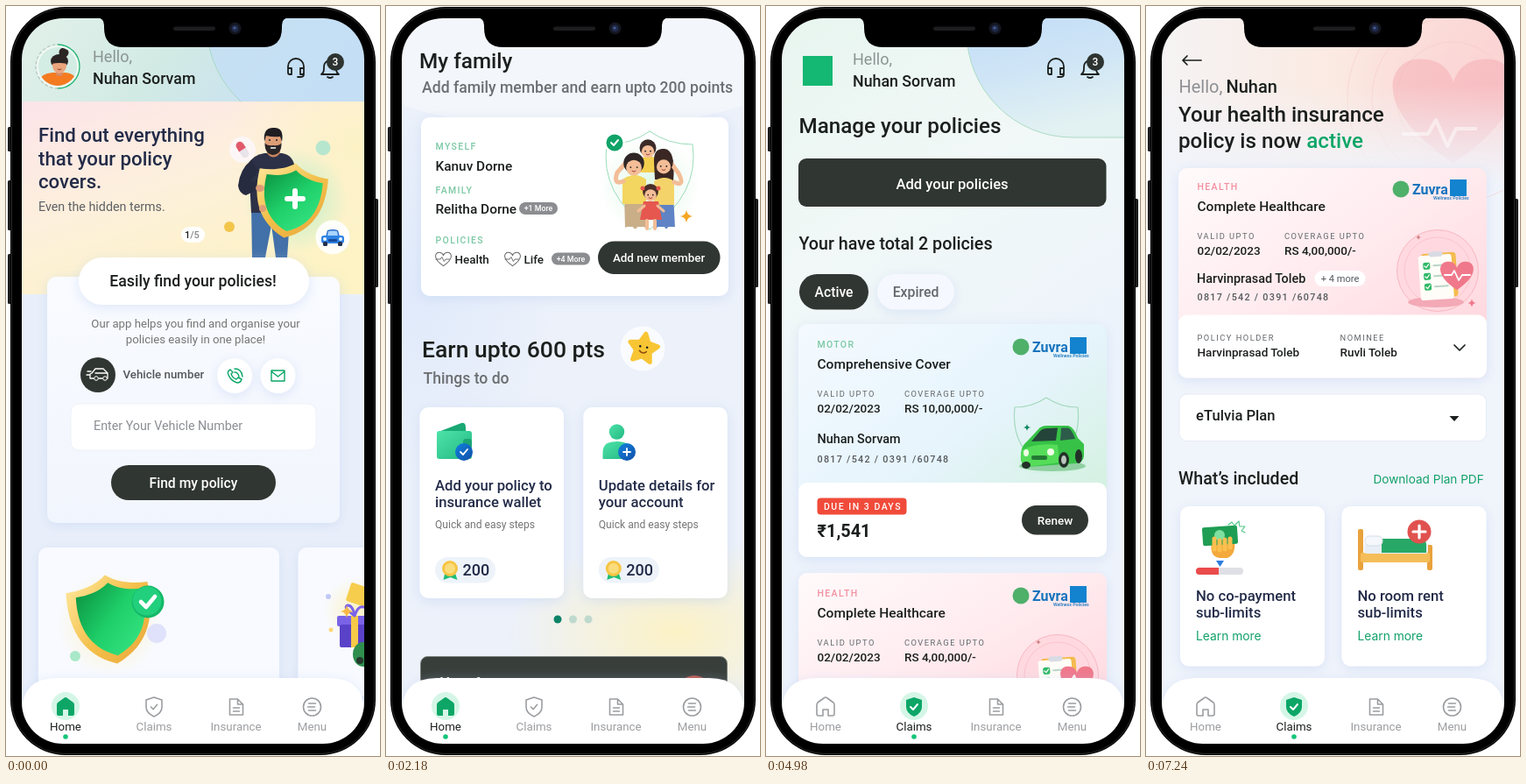
Animation, 427 px wide and 856 px high, one loop 8000 ms. Source, as an HTML page:

```html
<!DOCTYPE html>
<html lang="en">
<head>
<meta charset="utf-8">
<style>
  html, body { margin: 0; width: 100%; height: 100%; overflow: hidden; background: #fff; }
  svg { display: block; font-family: Roboto, sans-serif; }
</style>
</head>
<body>
<script>
const INK = '#1b1f1d', NAVY = '#232b48', GREY = '#757575', DARK = '#303632', GREEN = '#0da667';

// Drawing helpers: each returns SVG markup.
const text = (x, y, size, str, { fill = INK, w = 500, gap = 0, mid = false, font = '' } = {}) =>
  `<text x="${x}" y="${y}" font-size="${size}" font-weight="${w}" fill="${fill}" xml:space="preserve"` +
  (gap ? ` letter-spacing="${gap}"` : '') + (mid ? ' text-anchor="middle"' : '') +
  (font ? ` font-family="${font}"` : '') + `>${str}</text>`;
const box = (x, y, w, h, r, fill, extra = '') =>
  `<rect x="${x}" y="${y}" width="${w}" height="${h}" rx="${r}" fill="${fill}" ${extra}/>`;
const dot = (x, y, r, fill, extra = '') => `<circle cx="${x}" cy="${y}" r="${r}" fill="${fill}" ${extra}/>`;
const oval = (x, y, rx, ry, fill, extra = '') => `<ellipse cx="${x}" cy="${y}" rx="${rx}" ry="${ry}" fill="${fill}" ${extra}/>`;
const path = (d, fill, extra = '') => `<path d="${d}" fill="${fill}" ${extra}/>`;
const line = (d, stroke, w = 1.5, extra = '') =>
  path(d, 'none', `stroke="${stroke}" stroke-width="${w}" stroke-linecap="round" stroke-linejoin="round" ${extra}`);
const at = (x, y, s, inner, rot = 0) => `<g transform="translate(${x} ${y}) rotate(${rot}) scale(${s})">${inner}</g>`;
const grad = (id, x2, y2, ...stops) =>
  `<linearGradient id="${id}" x2="${x2}" y2="${y2}">${stops.map((c, i) =>
    `<stop offset="${i / (stops.length - 1)}" stop-color="${c}"/>`).join('')}</linearGradient>`;
const glow = (id, color) => `<radialGradient id="${id}"><stop stop-color="${color}"/>` +
  `<stop offset="1" stop-color="${color}" stop-opacity="0"/></radialGradient>`;

const SHADOW = 'filter="url(#shadow)"';
const SHIELD = 'M0-50C12-40 30-36 46-36C49 0 40 34 0 50C-40 34-49 0-46-36C-30-36-12-40 0-50Z';
const HEART = 'M0 9C-15-1-11-9-6-9C-3-9-1-8 0-5C1-8 3-9 6-9C11-9 15-1 0 9Z';
const SPARK = 'M0-8Q1-1 8 0Q1 1 0 8Q-1 1-8 0Q-1-1 0-8Z';
const tick = (x, y, s, color = '#fff', w = 2) => at(x, y, s, line('M-4 0L-1 3L4-3', color, w));
const plus = (x, y, r, color, w) => line(`M${x - r} ${y}h${2 * r}M${x} ${y - r}v${2 * r}`, color, w);
const page = fill => box(18, 14, 391, 828, 0, fill);

const defs = `<defs>
  ${grad('header', 1, 0.2, '#e2f1ea', '#d2eae4', '#c6dff6')}
  ${grad('banner', 0.6, 1, '#fce4ea', '#fdf0dc', '#fdf3c4')}
  ${grad('panel', 0, 1, '#f9fbff', '#f1f5fd')}
  ${grad('green', 1, 1, '#0a8f3e', '#1fd06a', '#3be887')}
  ${grad('gold', 1, 1, '#ffe9a0', '#f3c04b', '#e9a63a')}
  ${grad('teal', 1, 1, '#4de3a8', '#22b883')}
  ${grad('blue', 1, 1, '#0f82dd', '#134fa8')}
  ${grad('claims', 0.3, 1, '#e8f5ef', '#f1f8f7', '#edf3fb', '#eef3fb')}
  ${grad('sky', 0.3, 1, '#c3ddf7', '#cfe5f6', '#e2f1f2')}
  ${grad('motor', 1, 1, '#f4faff', '#e6f4fc', '#cdf0d6')}
  ${grad('health', 1, 1, '#fffafb', '#ffeaee', '#ffd2da')}
  ${grad('active', 1, 0, '#f5f3f4', '#fbeae2', '#fbd8d5')}
  <linearGradient id="fade" x2="0" y2="1"><stop stop-color="#f0f4fb" stop-opacity="0"/>
    <stop offset="1" stop-color="#f0f4fb"/></linearGradient>
  ${glow('yellowGlow', '#fcf2c6')}${glow('pinkGlow', '#fbcfd3')}${glow('greenGlow', '#b9f0c8')}${glow('blueGlow', '#e0eafb')}
  <clipPath id="screen"><rect x="18" y="14" width="391" height="828" rx="47"/></clipPath>
  <clipPath id="face"><circle r="22"/></clipPath>
  <filter id="shadow" x="-20%" y="-30%" width="140%" height="160%">
    <feDropShadow dx="0" dy="3" stdDeviation="7" flood-color="#b4c8ee" flood-opacity=".4"/></filter>
</defs>`;

const shield = (x, y, s, rot) => at(x, y, s,
  path(SHIELD, 'url(#gold)') + at(2, 0, 0.82, path(SHIELD, 'url(#green)')), rot);

// Greeting row with headset and bell.
const greeting = y =>
  text(99, y, 18, 'Hello,', { fill: '#8b9492', w: 400 }) + text(99, y + 25.3, 17.8, 'Nuhan Sorvam') +
  at(331, 71, 1, line('M-9 2V-2A9 9 0 0 1 9-2V2M-9 0h4v7h-2q-2 0-2-2ZM9 0h-4v7h2q2 0 2-2ZM9 5v2q0 3-4 3h-3', INK, 1.8)) +
  at(370, 73, 1, line('M-10 5q3-2 3-6v-3a7 7 0 0 1 14 0v3q0 4 3 6ZM-3 8q3 2 6 0', INK, 1.8)) +
  dot(376, 64, 10, '#2d3330') + text(376, 68.3, 12, '3', { fill: '#fff', mid: true });

const ARC = 'M229 14V29A121 121 0 0 0 350 150H409';

const tabIcons = [
  ['Home', 68, 'M-10-2Q-10-4-9-5L-2-10Q0-12 2-10L9-5Q10-4 10-2V8q0 2-2 2H3V3H-3V10H-8q-2 0-2-2Z'],
  ['Claims', 169, 'M0-11L9-8V0Q9 7 0 11Q-9 7-9 0V-8Z'],
  ['Insurance', 262.5, 'M-7-9H2L8-3V9H-7ZM2-9V-3H8M-3 1H4M-3 5H4'],
  ['Menu', 349.5, 'M-10 0a10 10 0 1 0 20 0a10 10 0 1 0-20 0M-4-4H4M-5 0H3M-4 4H4'],
];
const tabs = active => path('M18 842V807Q18 767 58 767H369Q409 767 409 807V842Z', '#fff', SHADOW) +
  tabIcons.map(([name, x, d], i) => {
    const on = i === active;
    const icon = on ? path(d, GREEN) + (i ? tick(0, 0, 1) : '') : line(d, '#9b9da0', 1.6) + (i === 1 ? tick(0, 0, 0.9, '#9b9da0', 1.7) : '');
    return (on ? dot(x, 799, 16, '#d5f6e7') + dot(x, 834, 2.8, '#16c47a') : '') + at(x, 800, 1, icon) +
      text(x, 827, 13.3, name, { fill: on ? INK : '#9b9da0', w: 400, mid: true });
  }).join('');

const avatar = at(59, 69, 1,
  dot(0, 0, 25, '#eef7f3') + dot(0, 0, 22, '#d3ece4') +
  `<g clip-path="url(#face)">` + dot(7, -16, 5.5, '#2b2524') + oval(2, -6, 10, 8, '#2b2524') +
  path('M-23 22Q-22 8-6 7H9Q22 8 24 22Z', '#f47b20') + box(-2, 2, 8, 9, 3, '#d98a62') + oval(2, -1, 8, 9, '#eaa57d') +
  path('M-7-3Q-4-13 5-10Q11-9 11-3Q2-5-7-3Z', '#2b2524') + line('M0 3q2 2 4 0', '#8d3b2a', 1) + '</g>' +
  line('M0-25A25 25 0 0 1 0 25', '#22b573', 1.3) + line('M0 25A25 25 0 0 1 0-25', '#b5c9c0', 1.3, 'stroke-dasharray="3 3"'));

const man =
  path('M280 228H325L321 287H308L303 250L296 287H281Z', '#4270a8') +
  path('M277 180Q282 170 295 168H315Q328 170 330 185V236H280Z', '#2d3147') +
  path('M280 176Q267 186 265 205Q266 214 274 216L294 206L290 198L279 201L288 188Z', '#272b40') +
  path('M298 158h15v10q-8 9-15 0Z', '#c98460') + oval(305, 154, 9.5, 12.500, '#dd9d76') +
  path('M295 155Q293 139 305 139Q318 138 315 155L313 149Q305 150 297 148Z', '#1f1d22') +
  path('M295.500 156Q298 160 305 159Q312 160 314.500 156Q315 169 305 170Q295 169 295.500 156Z', '#2a2526') +
  line('M302.500 162h5', '#fff', 1.5) + dot(301, 153, 1, INK) + dot(309, 153, 1, INK) +
  shield(324, 222, 0.86, 9) + plus(330, 220, 9, '#fff', 6) + oval(290, 208, 5, 4, '#dd9d76') + oval(293, 231, 4, 4, '#dd9d76');

const blueCar = at(373, 265, 1,
  path('M-8-2L-6-9Q0-11 6-9L8-2Z', '#2a6fd0') + path('M-6-3L-5-8Q0-9 5-8L6-3Z', '#a9d4fb') +
  box(-13, -3, 26, 9, 3, '#2f83e4') + box(-11, 4, 5, 5, 1.5, '#26324d') + box(6, 4, 5, 5, 1.5, '#26324d') +
  dot(-9, 1, 2, '#e9f5ff') + dot(9, 1, 2, '#e9f5ff') + box(-5, 1, 10, 3, 1, '#174a97'));

const gifts = oval(402, 690, 40, 40, 'url(#yellowGlow)') +
  box(391, 660, 24, 22, 2, '#f6cd4c', 'transform="rotate(18 400 670)"') + box(378, 696, 40, 12, 2, '#7b63e8') +
  box(381, 706, 36, 26, 2, '#5a42c8') + box(394, 696, 8, 36, 0, '#f7c948') +
  line('M398 696q-14-10-8-12q6 0 8 12q4-12 10-10', '#7b63e8', 3) + oval(408, 740, 12, 14, '#2f8f4f') + dot(404, 747, 4, '#253a2d') +
  dot(368, 674, 3, '#c2c8f6') + dot(371, 712, 2.500, '#ffd77a') + at(389, 691, 0.9, path(SPARK, '#fbb944'));

const home = page('#e9effa') +
  box(18, 109, 391, 220, 0, 'url(#banner)') +
  oval(400, 160, 150, 130, 'url(#yellowGlow)') + box(18, 14, 391, 95, 0, 'url(#header)') +
  path('M229 14V26A121 121 0 0 0 268 109H409V14Z', '#c5dff6', 'opacity=".8"') + line('M229 14V26A121 121 0 0 0 268 109', '#a8d8c4', 1) +
  avatar + greeting(64) +
  ['Find out everything', 'that your policy', 'covers.'].map((s, i) => text(37, 155 + i * 26.7, 22.2, s, { fill: NAVY })).join('') +
  text(37, 234, 14.3, 'Even the hidden terms.', { fill: '#5d6064', w: 400 }) +
  box(200, 252, 27, 18, 9, '#fff') + text(204, 265, 11, '1<tspan fill="#888">/5</tspan>') +
  dot(270, 164, 15, '#fdf6f6') + at(270, 164, 1, box(-4.500, -10, 9, 20, 4.500, '#e9e3ea') + path('M-4.500 0V-5.500a4.500 4.500 0 0 1 9 0V0Z', '#e2596a'), -32) +
  dot(362, 162, 8.500, '#b7e6cf') + dot(255, 252, 6, '#f3c54b') + oval(330, 222, 60, 60, 'url(#greenGlow)') + man +
  dot(373, 264, 19.5, '#fff', 'opacity=".9"') + blueCar +
  box(47, 309, 334, 281, 10, 'url(#panel)', SHADOW) + box(83, 287, 263, 54, 27, '#fff', SHADOW) +
  text(213.5, 320, 17.7, 'Easily find your policies!', { mid: true }) +
  text(216.5, 367, 13.2, 'Our app helps you find and organise your', { fill: GREY, w: 400, mid: true }) +
  text(216.5, 384.5, 13.2, 'policies easily in one place!', { fill: GREY, w: 400, mid: true }) +
  dot(105, 421, 20, DARK) +
  line('M100 425h-4v-5l2-1l4-5h9l5 5v6h-3M106 425h4M93 417h4M92 421h3M102 419h14', '#fff', 1.3) + dot(103, 425, 2.3, DARK, 'stroke="#fff"') + dot(113, 425, 2.3, DARK, 'stroke="#fff"') +
  text(133.5, 425, 13.3, 'Vehicle number', { fill: '#53575a' }) +
  dot(261, 422, 20, '#fff', SHADOW) + line('M256 415q-4 2-2 6q3 7 10 9q4 0 5-4l-4-2l-2 2q-4-1-6-6l2-2ZM261 418q4 0 5 5M261 414q8 0 9 9', GREEN, 1.4) +
  dot(310.5, 422, 20, '#fff', SHADOW) + line('M303 416h15v12h-15ZM303 417l7.500 6l7.500-6', GREEN, 1.4) +
  box(74, 454, 280, 53, 9, '#fff', 'stroke="#edf1f8"') + text(100, 484, 14.3, 'Enter Your Vehicle Number', { fill: '#8b8e93', w: 400 }) +
  box(120, 524, 188, 40, 20, DARK) + text(214, 549.5, 15.7, 'Find my policy', { fill: '#fff', mid: true }) +
  box(37, 618, 275, 170, 10, '#f8faff', SHADOW) + box(333.5, 618, 275, 170, 10, '#f8faff', SHADOW) +
  oval(118, 705, 60, 60, 'url(#yellowGlow)') + dot(172, 716, 11, '#dfe2fa') + dot(79, 742, 6, '#a9e8c8') +
  shield(120, 700, 1.02, -8) + dot(162, 680, 18.5, '#14b868') + dot(161, 679, 16.5, '#22cf7c') + tick(162, 680, 2, '#fff', 2.3) + gifts;

const face = (x, y, r, hair) => dot(x, y - r * 0.25, r * 1.12, hair) + oval(x, y + r * 0.25, r * 0.85, r * 0.85, '#f3bd97') +
  dot(x - r * 0.35, y + r * 0.2, 0.9, INK) + dot(x + r * 0.35, y + r * 0.2, 0.9, INK) +
  line(`M${x - 2} ${y + r * 0.6}q2 2 4 0`, '#a2412f', 1);
const family = oval(301, 205, 58, 55, 'url(#greenGlow)', 'opacity=".45"') +
  line('M301 143Q322 158 350 158Q358 215 301 255Q244 215 252 158Q280 158 301 143Z', '#9bdcb9', 1) + dot(261, 156, 12, '#fff') + dot(261, 156, 9.5, '#0fa368') + tick(261, 156, 1) +
  path('M288 175Q300 168 312 175L314 190H287Z', '#f3cf4e') + face(299, 164, 8.500, '#3a2a28') +
  path('M306 178Q305 162 318 163Q331 164 328 200L307 198Z', '#3a2723') +
  path('M272 214H296V254H273Z', '#c9ae88') + path('M306 214H328L330 254H308Z', '#5f83c4') +
  path('M270 198Q284 188 297 198V226H270Z', '#f2d65f') + path('M306 200Q318 192 329 200V227H306Z', '#f4d46a') +
  line('M271 200Q259 205 264 190L273 180M329 201Q342 207 334 191L326 180', '#f3bd97', 5) +
  face(283, 182, 10.500, '#2d2625') + face(317, 181, 9.500, '#3a2723') +
  path('M294 223H311L315 244H290Z', '#e5574f') + line('M298 245v9M307 245v9', '#f3bd97', 4) + line('M295 228l-7 6M310 228l7 6', '#f3bd97', 3) +
  face(302, 214, 8, '#4a2f28') + dot(293, 208, 2.500, '#e5574f') + dot(311, 208, 2.500, '#e5574f') +
  line('M275 254h6M288 254h6M311 254h6M323 254h6', '#fff', 4) + at(343, 240, 0.9, path(SPARK, '#f5a623'));

const pulseHeart = x => at(x, 289, 0.85, line(HEART, '#666', 1.2) + line('M-10 0h6l2-3l3 6l2-3h5', '#666', 1.1));
const smallPill = (x, w, y, str) => box(x, y, w, 14, 7, '#8b8d90') + text(x + w / 2, y + 10, 8.8, str, { fill: '#fff', mid: true });
const label = (x, y, str, fill = '#7cc8a4') => text(x, y, 10.5, str, { fill, gap: 1.35 });
const task = (x, lines, icon) => box(x, 458, 164.5, 218, 10, '#fff', SHADOW) + icon +
  lines.map((s, i) => text(x + 17.5, 552.5 + i * 19.5, 16.65, s, { fill: NAVY })).join('') +
  text(x + 17.5, 596, 12.1, 'Quick and easy steps', { fill: GREY, w: 400 }) +
  box(x + 17.5, 629, 69, 29.5, 14.7, '#eef3fa') + path(`M${x + 29} 646l-2 9l8-3l8 3l-3-9Z`, '#1fbd74') +
  dot(x + 34.5, 642, 9, '#f6c544') + dot(x + 34.5, 642, 6, '#fbdc7c') + text(x + 49, 650.3, 18, '200', { fill: NAVY });
const badge = (x, y, mark) => dot(x, y, 10, 'url(#blue)') + mark;

const familyPage = page('#ecf1fa') + oval(213, 30, 300, 110, '#f3f6fa') + oval(30, 330, 160, 220, 'url(#blueGlow)') +
  oval(330, 715, 190, 110, 'url(#yellowGlow)') +
  text(38, 71, 24.3, 'My family') + text(41, 98.5, 17.6, 'Add family member and earn upto 200 points', { fill: '#6c6f72' }) +
  box(40, 127, 351, 204, 10, '#fff', SHADOW) +
  label(56.5, 164, 'MYSELF') + text(56.5, 187.5, 15.4, 'Kanuv Dorne') +
  label(56.5, 213.5, 'FAMILY') + text(56.5, 236.5, 15.4, 'Relitha Dorne') + smallPill(152, 44, 224, '+1 More') +
  label(56.5, 270.5, 'POLICIES') + pulseHeart(65.5) + text(78.5, 293.7, 13.4, 'Health') +
  pulseHeart(144.5) + text(157.5, 293.7, 13.4, 'Life') + smallPill(189, 44, 281.5, '+4 More') + family +
  box(242, 268.5, 139.5, 37.5, 18.75, DARK) + text(311.5, 292, 13.4, 'Add new member', { fill: '#fff', mid: true }) +
  text(41, 400.5, 26.5, 'Earn upto 600 pts') + dot(293, 391, 25.5, '#fff', 'opacity=".75"') +
  at(294, 390, 1, path('M0-16L5-6L16-4L8 4L10 15L0 10L-10 15L-8 4L-16-4L-5-6Z', '#f8c534', 'stroke="#f8c534" stroke-width="5" stroke-linejoin="round"') +
    dot(-4, -1, 1.3, INK) + dot(4, -1, 1.3, INK) + line('M-4 4q4 4 8 0', '#8a4a12', 1.5), 10) +
  text(42.5, 431, 17.6, 'Things to do', { fill: '#6c6f72' }) +
  task(38.5, ['Add your policy to', 'insurance wallet'],
    path('M60 486L86 476Q91 475 91 481V488H60Z', '#19a873') + box(58, 485, 40, 32, 3, 'url(#teal)') + box(88, 494, 10, 10, 3, '#1ca574') +
    badge(89, 509, tick(89, 509, 1, '#fff', 1.8))) +
  task(225.3, ['Update details for', 'your account'],
    dot(263.5, 486, 8.7, 'url(#teal)') + path('M247.500 517V508Q248 497 263.500 497Q279 497 279.500 508V517Z', 'url(#teal)') +
    badge(275, 509, plus(275, 509, 4, '#fff', 1.8))) +
  dot(196, 700, 4.5, '#0b8266') + dot(213.5, 700, 4.5, '#bfd9cd') + dot(231, 700, 4.5, '#bfd9cd') +
  box(39.5, 742.5, 350, 60, 8, '#383e3a', 'stroke="#7d827c"') + dot(352, 784, 20, '#b5574c') + text(62, 777.5, 17, 'Your forms', { fill: '#fff' });

const insurerLogo = y => dot(291, y, 9.500, '#4fb06a') + text(304, y + 5.5, 16, 'Zuvra', { fill: '#1573bd', w: 700 }) +
  box(347, y - 11, 19, 19, 0, '#1383cf') + text(328, y + 11.5, 5.2, 'Wellness Policies', { fill: '#1573bd' });
const field = (x, y, name, value) => text(x, y, 9.3, name, { fill: '#62666a', w: 400, gap: 1.5 }) + text(x, y + 18, 13.5, value);
const policyTop = (y, kind, tint, title, cover) => label(58.5, y + 26.5, kind, tint) + text(58.5, y + 50.5, 15.5, title) +
  field(58.5, y + 82.5, 'VALID UPTO', '02/02/2023') + field(158, y + 82.5, 'COVERAGE UPTO', cover) + insurerLogo(y + 26);
const policyNumber = y => text(58.5, y, 10.8, '0817 /542 / 0391 /60748', { fill: '#55595d', gap: 1.27 });

const greenCar = line('M320 447Q336 458 356 458Q361 505 320 528Q279 505 284 458Q304 458 320 447Z', '#a5d9bd', 1.2) +
  oval(326, 520, 46, 16, 'url(#greenGlow)') + oval(327, 525, 38, 6, '#8fcfa0') +
  path('M298 497L311 483Q314 479 321 479L345 479Q351 480 356 493L363 500V514Q362 521 354 522L298 526Q290 524 291 513Q291 502 298 497Z', '#37c247') +
  path('M303 497L313 485Q316 482 321 482L333 481.500L331 496Z', '#24443a') + path('M337 481.500L345 481.500Q349 483 353 494L336 496Z', '#2d5b4a') +
  path('M292 507Q308 498 333 501L335 521L298 526Q289 524 292 507Z', '#55dd59') + oval(297, 510, 3, 4, '#efffe6') + oval(325, 509, 4, 4, '#efffe6') +
  box(303, 513, 18, 5, 2, '#247a34') + oval(340, 518, 6, 9, '#223028') + oval(357, 514, 4, 8, '#223028') + oval(340, 518, 3, 5, '#b9c5bd') +
  oval(297, 524, 5, 4, '#223028') + at(298, 481, 0.5, path(SPARK, '#148a63'));

const checklist = (x, y) => at(x, y, 1,
  dot(0, -1, 46.5, '#ffd9df', 'stroke="#f8b7c2"') + dot(0, -1, 38, 'none', 'stroke="#fbc3cc"') +
  oval(-2, 35, 32, 6, '#f3a9b6') +
  at(-1, 3, 1, box(-17, -24, 40, 51, 4, '#f4bb4e') + box(-20, -22, 38, 51, 3, '#fffdf8') + box(-8, -26, 16, 6, 3, '#d9dbe4') +
    [-11, 1, 13].map(v => box(-15, v - 3, 8, 8, 2, '#31b967') + tick(-11, v + 1, 0.6) + line(`M-3 ${v + 1}h15`, '#b9d5c6', 2)).join(''), -4) +
  at(22, 5, 1.8, path(HEART, '#f0788b')) + line('M8 4h8l3-5l5 11l4-6h9', '#fff', 1.8) +
  at(39, 36, 0.6, path(SPARK, '#f0788b')) + at(-22, -39, 0.35, path(SPARK, '#c77')));

const healthCard = (y, h, textY = y) => box(37, y, 352, h, 10, 'url(#health)', SHADOW) +
  policyTop(textY, 'HEALTH', '#f2909f', 'Complete Healthcare', 'RS 4,00,000/-') + checklist(333, y + 118);

const claimsPage = page('url(#claims)') + path(ARC + 'V14Z', 'url(#sky)') + line(ARC, '#aadbc4', 1) +
  box(42, 57, 34, 34, 0, '#14b872') + greeting(67) +
  text(37.5, 145, 24.2, 'Manage your policies') +
  box(37, 174, 351.5, 55, 9, DARK) + text(212.5, 209, 16.6, 'Add your policies', { fill: '#fff', mid: true }) +
  text(37.5, 278, 19.7, 'Your have total 2 policies') +
  box(38, 306, 79, 40.5, 20.2, DARK) + text(77.5, 332, 15.7, 'Active', { fill: '#fff', mid: true }) +
  box(127, 306, 88, 40.5, 20.2, '#f5f9ff', SHADOW) + text(171, 332, 15.8, 'Expired', { fill: '#64686c', mid: true }) +
  box(37, 363, 352, 266, 10, 'url(#motor)', SHADOW) + policyTop(363, 'MOTOR', '#7cc8a4', 'Comprehensive Cover', 'RS 10,00,000/-') +
  text(58.5, 499.3, 14.4, 'Nuhan Sorvam') + policyNumber(520.5) + greenCar +
  box(37, 544, 352, 85, 10, '#fff') + box(58.5, 561.5, 102, 19, 4, '#f04b3a') +
  text(66, 574.8, 10.5, 'DUE IN 3 DAYS', { fill: '#fff', gap: 1.5 }) + text(58.5, 606, 19.9, '₹1,541', { w: 600 }) +
  box(292, 570, 76, 33.5, 16.7, DARK) + text(330, 591.5, 13.5, 'Renew', { fill: '#fff', mid: true }) + healthCard(647, 200);

const benefit = (x, lines, icon) => box(x, 571, 165, 182.5, 10, '#fff', SHADOW) + icon +
  lines.map((s, i) => text(x + 18, 679 + i * 19.3, 16.7, s, { fill: NAVY })).join('') +
  text(x + 18, 724, 13.8, 'Learn more', { fill: '#12a168', w: 400, font: 'Inter, sans-serif' });

const activePage = page('#f0f4fb') + box(18, 14, 391, 190, 0, 'url(#active)') + oval(390, 90, 170, 120, 'url(#pinkGlow)', 'opacity=".6"') +
  [64, 92, 120].map(r => dot(350, 105, r, 'none', 'stroke="#f6c6c4" opacity=".5"')).join('') +
  at(351, 120, 6.6, path(HEART, '#f4a3aa', 'opacity=".42"')) + box(18, 90, 391, 114, 0, 'url(#fade)') +
  line('M294 146H322L331 130L344 160L354 140H376', '#fff', 4, 'opacity=".5"') +
  line('M63 62H42M47 57L42 62L47 67', INK, 1.7) +
  text(37.5, 98.5, 20, 'Hello, ', { fill: '#8d8f93', w: 400 }) + text(91.5, 98.5, 20, 'Nuhan') +
  text(37, 131.5, 24.2, 'Your health insurance') + text(37, 161.5, 24.2, `policy is now <tspan fill="${GREEN}">active</tspan>`) +
  healthCard(185, 239.5, 183) + text(58, 315.5, 14.4, 'Harvinprasad Toleb') + box(192.5, 302, 58, 18, 9, '#fff') +
  text(221.5, 314.7, 11.1, '+ 4 more', { fill: '#55595d', w: 400, mid: true }) + policyNumber(335.5) +
  box(37, 352.5, 352, 72, 10, '#fff') + field(58.5, 382, 'POLICY HOLDER', 'Harvinprasad Toleb') + field(221.5, 382, 'NOMINEE', 'Ruvli Toleb') +
  line('M352 387l6 6l6-6', INK, 1.7) +
  box(38, 443, 350.5, 53.5, 9, '#fff', 'stroke="#e6ecf6"') + text(57, 472.5, 16.6, 'eTulvia Plan') + path('M346.500 468h11l-5.500 6Z', INK) +
  text(37, 546, 19.6, 'What’s included') + text(259.5, 545, 13.6, 'Download Plan PDF', { fill: '#12a168', w: 400, font: 'Inter, sans-serif' }) +
  benefit(39, ['No co-payment', 'sub-limits'],
    path('M75 612Q72 628 84 630H93Q103 626 101 610Z', '#f3a93b') + box(64.5, 594, 40, 21, 2, '#1f9d53', 'transform="rotate(-4 84 604)"') +
    dot(84, 604, 6, '#7fe0a0') + line('M78 620v-12M84 621v-11M90 620v-11M96 618v-10', '#fbc04f', 5) +
    line('M94 592l4-3l3 4l5-5l1 6l6 0l-4 5l4 2', '#54c98c', 1.2) + path('M80 633h9l-4.500 7Z', '#2c7de0') +
    box(57, 641, 54, 8, 4, '#dfe0e6') + path('M83 641H61a4 4 0 0 0 0 8H83Z', '#ea4b4b')) +
  benefit(223.5, ['No room rent', 'sub-limits'],
    box(242, 597, 6, 47, 2, '#e9a23c') + box(321, 615, 6, 29, 2, '#e9a23c') + box(245, 624, 79, 11, 2, '#f5bd58') +
    box(249, 614, 73, 11, 3, '#e8eef5') + path('M269 608H313Q320 608 320 615V624H269Z', '#28a866') + box(250, 605, 20, 11, 5, '#f4f7fb', 'stroke="#d5dde8"') +
    dot(312, 600, 13.5, '#e0524f') + plus(312, 600, 7, '#fff', 3.2));

const bezel = [[2, 138, 28], [2, 199, 57], [2, 283, 57], [420, 220, 101]].map(([x, y, h]) => box(x, y, 5, h, 1.5, '#1c1c1c')).join('') +
  path('M68 1H359A63 63 0 0 1 422 64V792A63 63 0 0 1 359 855H68A63 63 0 0 1 5 792V64A63 63 0 0 1 68 1Z' +
    'M65 14A47 47 0 0 0 18 61V795A47 47 0 0 0 65 842H362A47 47 0 0 0 409 795V61A47 47 0 0 0 362 14Z', '#000', 'fill-rule="evenodd"') +
  box(6.5, 2.5, 414, 851, 61.500, 'none', 'stroke="#2b2b2b"') +
  path('M104 13Q112 14 112 22V25Q112 47 134 47H293Q315 47 315 25V22Q315 14 323 13Z', '#000') +
  box(191, 23.5, 48, 4.5, 2.2, '#1d1d1f') + dot(261.5, 25.5, 7, '#14161f') + dot(261.5, 25.5, 4, '#1f2a4a') + dot(261, 25, 1.6, '#4a5f94');

const scenes = [[0, home, 0], [500, familyPage, 0], [3300, claimsPage, 1], [6100, activePage, 1]];
document.body.innerHTML = `<svg width="100%" height="100%" viewBox="0 0 427 856">${defs}<g clip-path="url(#screen)">` +
  scenes.map(([, art, tab]) => `<g class="scene">${art}${tabs(tab)}</g>`).join('') + `</g>${bezel}</svg>`;

const groups = document.querySelectorAll('.scene');
function show() {
  const t = performance.now() % 8000;
  const current = scenes.filter(([start]) => start <= t).length - 1;
  groups.forEach((g, i) => g.style.display = i === current ? '' : 'none');
  requestAnimationFrame(show);
}
show();
</script>
</body>
</html>
```
